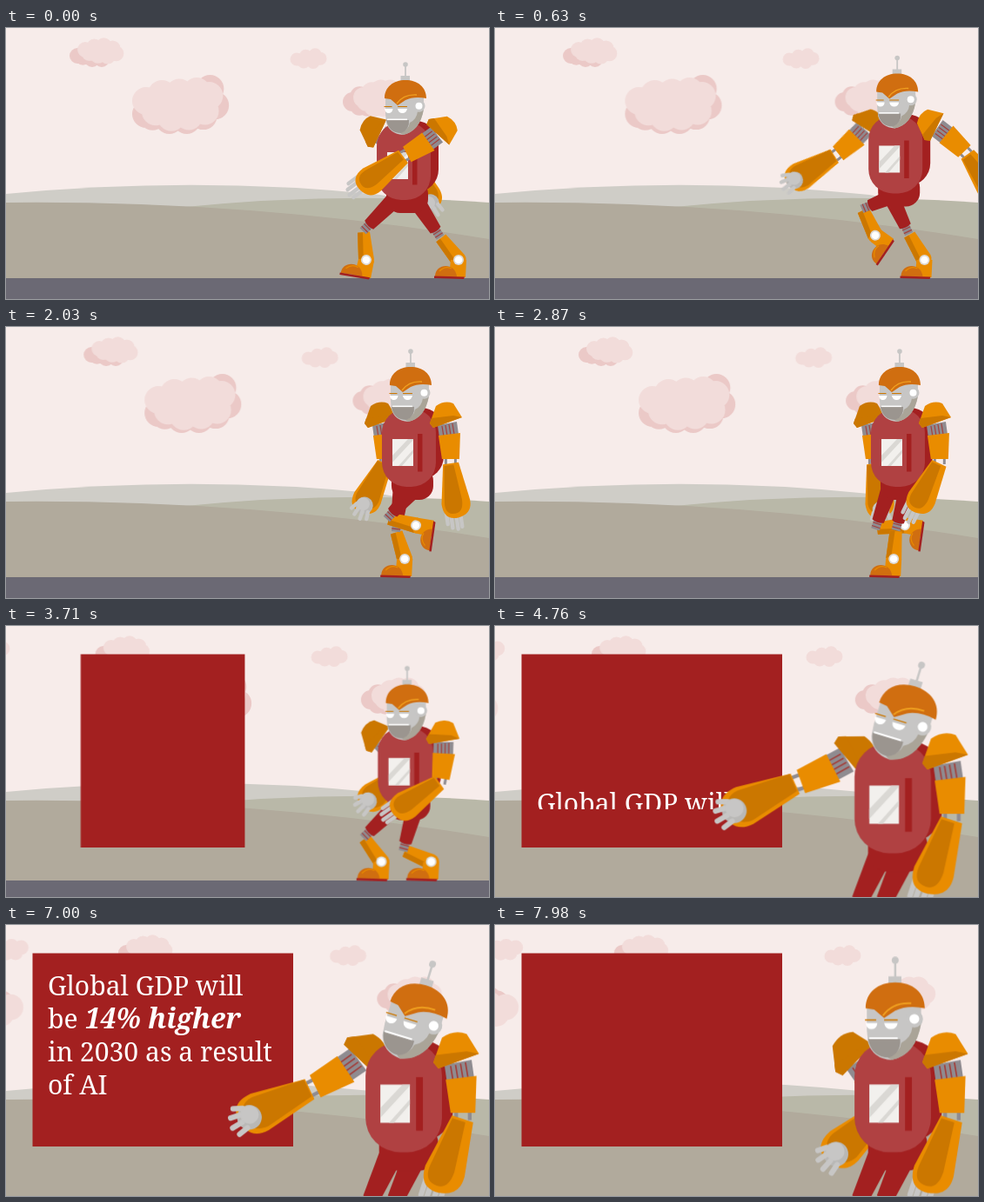
Animation, 555 px wide and 312 px high, one loop 8000 ms. Source, as an HTML page:

```html
<!DOCTYPE html>
<html lang="en">
<head>
<meta charset="utf-8">
<title>Robot presenter</title>
<style>
html, body { margin: 0; width: 100%; height: 100%; overflow: hidden; background: #f7ecea; }
svg { display: block; width: 100vw; height: 100vh; }
.cloud { animation: drift 8s linear infinite; stroke-linejoin: round; stroke-linecap: round; stroke-dasharray: 0 11; }
.cloud.big { stroke-dasharray: 0 20; }
.cloud .back { fill: #ebc9c7; stroke: #ebc9c7; }
.cloud .front { fill: #f2dcda; stroke: #f2dcda; }
#panel { transform-origin: 180.25px 0; animation: open 8s cubic-bezier(.65,0,.35,1) infinite; }
#copy { font: 30.1px "Noto Serif", serif; fill: #fff; animation: reveal 8s cubic-bezier(.65,0,.35,1) infinite; }
#copy .strong { font-weight: 900; font-style: italic; font-size: 32px; }
.red { fill: #a32020; }
.body { fill: #b04142; }
.gold { fill: #e98c00; }
.amber { fill: #cb7700; }
.dots { fill: #d06e10; }
.grey { fill: #c7c6c5; }
.white { fill: #fff; }
.pad { fill: var(--pad, #e98c00); }
.finger { fill: none; stroke: #c7c6c5; stroke-width: 4.4; stroke-linecap: round; }
.coil { fill: #8f8b90; }
.ribs { fill: none; stroke: #a3403c; stroke-width: 1.2; }
#farArm { --pad: #cb7700; }
@keyframes drift { to { transform: translateX(var(--dx)); } }
@keyframes open {
  0%, 42.5% { transform: scaleX(0); }
  49.6%, 100% { transform: scaleX(1); }
}
@keyframes reveal {
  0%, 56.9% { transform: translateY(165px); }
  65.2%, 85.6% { transform: none; }
  93.7%, 100% { transform: translateY(165px); }
}
</style>
</head>
<body>
<svg viewBox="0 0 555 312" preserveAspectRatio="none">
  <defs>
    <clipPath id="copyBox"><path d="M31 33H330V211H31z"/></clipPath>

    <g id="upperArm">
      <path class="coil" d="M-10 8L12 4L14 18L-8 22z"/>
      <path class="ribs" d="M-5 9l2 12M-1 8l2 12M3 7l2 12M7 6l2 12"/>
      <path class="coil" d="M-2 46h3v7h-3zM9 46h3v7h-3z"/>
      <path class="gold" d="M-9 20L16 17L15 47L-5 47z"/>
      <path class="pad" d="M-19 6L-12 -14Q-2 -21 8 -17L18 -1L-15 11z"/>
      <path class="amber" d="M-19 6L-17 0L8 -3L18 -1L-15 11z"/>
    </g>
    <path id="sleeve" d="M-9 1L9 1L16 45C17 60 7 63 0 64C-12 65 -17 58 -17 46z"/>
    <g id="nearFore">
      <path class="finger" d="M-13 54L-13 70M-8 58L-8 75M-2 60L-2 77M3 60L3 75"/>
      <use href="#sleeve" class="gold"/>
      <path class="amber" d="M-8 3L3 3L7 44C7 56 2 59 -3 59C-10 59 -14 55 -13.500 46z"/>
    </g>
    <g id="farFore">
      <use href="#sleeve" class="gold"/>
      <path class="amber" d="M-9 2L6 2L13 44C13 55 6 59 0 59C-8 59 -14 55 -14 46z"/>
      <circle cy="55" r="10" fill="#b9b8b6"/>
      <path class="finger" d="M-9 57L-12 64M-5 61L-6 69M1 62L2 71M7 60L9 68"/>
      <circle class="grey" cx="-2" cy="54" r="7.500"/>
    </g>

    <g id="thigh">
      <path class="coil" d="M-5 44h10v11h-10z"/>
      <path class="ribs" d="M-5 48h10M-5 52h10"/>
      <path class="red" d="M-10 0Q0 -10 10 0L7 45Q0 48 -7 45z"/>
    </g>
    <g id="shin">
      <path class="gold" d="M-7 2L7 2L9 34A9 9 0 0 1 -9 34z"/>
      <path class="amber" d="M-7 2L-1 2L-3 30L-9 34z"/>
    </g>
    <g id="foot">
      <path class="gold" d="M-9 0L9 0L8 20L-11 20z"/>
      <path class="dots" d="M-27 19C-27 4 -4 2 -2 19z"/>
      <path d="M-22 13Q-15 6 -8 10" fill="none" stroke="#e98c00" stroke-width="1.2"/>
      <path class="red" d="M-28 18.5L7 19.5L6 22L-28 21z"/>
      <circle r="6" fill="#dcd9d5"/>
      <circle class="white" r="4.3"/>
    </g>
  </defs>

  <path fill="#f7ecea" d="M0 0H555V312H0z"/>

  <g class="cloud" style="--dx:64px">
    <path class="back" stroke-width="18" d="M82 32L90 26L116 33L112 36L97 36z"/>
    <path class="front" stroke-width="18" d="M91 25L103 21L116 20L129 27L122 33L108 32L98 31z"/>
  </g>
  <g class="cloud" style="--dx:52px">
    <path class="front" stroke-width="15" d="M334 36L345 32L361 30L361 38L350 40L342 39z"/>
  </g>
  <g class="cloud big" style="--dx:56px">
    <path class="back" stroke-width="32" d="M161 99L234 69L241 92L222 104L207 106L180 106z"/>
    <path class="front" stroke-width="32" d="M161 84L178 76L206 74L233 72L234 91L224 99L207 102L184 103L168 94z"/>
  </g>
  <g class="cloud" style="--dx:45px">
    <path class="back" stroke-width="22" d="M398 85L406 78L420 88L412 93z"/>
    <path class="front" stroke-width="24" d="M411 80L424 72L441 71L451 81L437 90L420 90z"/>
  </g>
  <g class="cloud" style="--dx:52px">
    <path class="front" stroke-width="17" d="M-60 30L-44 24L-28 26L-29 31L-40 33z"/>
  </g>
  <g class="cloud big" style="--dx:59px">
    <path class="back" stroke-width="28" d="M-85 90L-54 82L-60 95z"/>
    <path class="front" stroke-width="30" d="M-85 97L-60 90L-43 96L-54 102L-75 102z"/>
  </g>

  <path fill="#cfcdc7" d="M0 191Q220 170 430 192L555 215V312H0z"/>
  <path fill="#b9b8a8" d="M195 207Q380 188 555 201V312H195z"/>
  <path fill="#b1aa9c" d="M0 201Q280 198 555 243V312H0z"/>

  <path id="panel" class="red" d="M30.5 32.5H330V255H30.5z"/>
  <g clip-path="url(#copyBox)">
    <g id="copy">
      <text x="48" y="71">Global GDP will</text>
      <text x="48" y="109">be <tspan class="strong">14% higher</tspan></text>
      <text x="48" y="147">in 2030 as a result</text>
      <text x="48" y="185">of AI</text>
    </g>
  </g>

  <g id="stage">
    <path fill="#6b6974" d="M-200 288H900V400H-200z"/>
    <g id="farArm"><use href="#upperArm"/><use id="farForearm" href="#farFore"/></g>
    <use id="farShin" href="#shin"/><use id="farFoot" href="#foot"/><use id="farThigh" href="#thigh"/>
    <use id="nearShin" href="#shin"/><use id="nearFoot" href="#foot"/><use id="nearThigh" href="#thigh"/>
    <g id="torso">
      <rect class="red" x="-20" y="22" width="48" height="38" rx="16"/>
      <rect class="red" x="-16" y="-46" width="56" height="82" rx="26"/>
      <rect class="body" x="-31" y="-45" width="62" height="90" rx="28"/>
      <path fill="#f2f0ed" d="M-19 -10H5V21H-19z"/>
      <path fill="#dad8d4" d="M-19 17V9L-1 -10H5V-9zM-12 21L5 2V6L-8 21z"/>
      <path class="red" d="M10 -16h5.5v43.5h-5.5z"/>
      <g id="head">
        <path class="grey" d="M-5.5 -26h10.5v6h-10.5zM-.9 -38h1.800v13h-1.800z"/>
        <circle class="grey" cy="-39" r="2.8"/>
        <path class="grey" d="M-23 -2L-23 18L-22 28Q-18 41 -3 42Q16 38 21 13L21 -2z"/>
        <path fill="#aaa498" d="M21 12Q17 38 -3 42L-6 40Q4 36 5 28Q13 24 14 15z"/>
        <path fill="#9b958f" d="M-22 25H4Q5 36 -5 40Q-19 40 -22 25z"/>
        <path class="white" d="M-21 23.6H2v1.5H-21z"/>
        <g id="eyes" class="white">
          <path d="M-24 12H-14.5Q-15 17 -19.5 17Q-23 17 -24 12zM-9 12H2Q1 17 -3.5 17Q-8 17 -9 12z"/>
        </g>
        <path id="brows" d="M-24.5 9.5h9M-9 9.5h11" stroke="#cb7700" stroke-width="1"/>
        <circle class="grey" cx="15.5" cy="8.7" r="7"/>
        <circle class="white" cx="15.5" cy="8.7" r="4"/>
        <path class="dots" d="M-24 0C-24 -13 -14 -21 0 -21S24 -13 24 0Q10 -3 0 2L-9 8L-17 1z"/>
        <path d="M-10 6Q-2 -5 13 -4" fill="none" stroke="#f0a020" stroke-width="1.4"/>
      </g>
    </g>
    <g id="nearArm"><use href="#upperArm"/><use id="nearForearm" href="#nearFore"/></g>
  </g>
</svg>
<script>
const LOOP = 8000, STEP = 70, CYCLE = 1680, WALK_END = 3360;
const THIGH = 54, SHIN = 34, DEG = 180 / Math.PI, TAU = Math.PI * 2;
const part = id => document.getElementById(id);
const place = (id, x, y, angle = 0) =>
  part(id).setAttribute('transform', `translate(${x} ${y}) rotate(${angle})`);

function tween(t, from, to) {
  const u = Math.min(1, Math.max(0, (t - from) / (to - from)));
  return u < .5 ? 4 * u ** 3 : 1 - 4 * (1 - u) ** 3;
}
const mix = (a, b, k) => a.map((v, i) => v + (b[i] - v) * k);

// Upper and lower arm angles; positive swings to the left.
function armSwing(p) {
  const c = Math.cos(TAU * p), s = Math.sin(TAU * p), c2 = Math.cos(2 * TAU * p);
  return [4 + 53.5 * c - 14.4 * s + 4.5 * c2, 11.3 + 39 * c - 28 * s + 2.7 * c2];
}

// Ankle x, y and foot angle: stance first, then swing.
function ankle(phase) {
  const p = phase % 1;
  if (p < .5) return [414 + 212 * p, 267, 8 * Math.max(0, 1 - p / .06)];
  const u = p * 2 - 1, lift = Math.sin(Math.PI * u);
  return [520 - 106 * u - 5 * lift, 267 - 40 * lift, 8 * u - 90 * lift];
}

// Pose: torso x, y; near arm; far arm; far foot; near foot.
function walk(p) {
  const bob = Math.cos(2 * TAU * p);
  return [460.2 - 3.2 * bob, 145.5 + 7.5 * bob,
    ...armSwing(p), ...armSwing(p + .5), ...ankle(p), ...ankle(p + .5)];
}
const upright = [445, 278, 0, 465, 278, 0];
const crouch = [459, 160, 10, 55, -35, 52, 432, 267, 0, 488, 267, 0];
const point = [458.8, 157, 0, 18, 70, 66, ...upright];
const rest = [458.8, 157, 0, 18, -26, 48, ...upright];

function pose(t) {
  if (t < WALK_END) return walk(t / CYCLE % 1);
  const stand = mix(walk(0), crouch, tween(t, WALK_END, 3700));
  return mix(mix(stand, point, tween(t, 3950, 4720)), rest, tween(t, 6820, 7520));
}

function drawArm(name, x, y, upper, lower) {
  place(name + 'Arm', x, y, upper);
  place(name + 'Forearm', 5, 51, lower - upper);
}

function drawLeg(name, hx, hy, ax, ay, footAngle) {
  const dx = hx - ax, dy = ay - hy;
  const d = Math.min(Math.hypot(dx, dy), THIGH + SHIN - .1);
  const bend = Math.acos((THIGH ** 2 + d ** 2 - SHIN ** 2) / (2 * THIGH * d));
  const a = Math.atan2(dx, dy) + bend;
  const kx = hx - THIGH * Math.sin(a), ky = hy + THIGH * Math.cos(a);
  place(name + 'Thigh', hx, hy, a * DEG);
  place(name + 'Shin', kx, ky, Math.atan2(kx - ax, ay - ky) * DEG);
  place(name + 'Foot', ax, ay, footAngle);
}

function draw(t) {
  const [x, y, nearUpper, nearLower, farUpper, farLower, ...legs] = pose(t);
  const zoom = 1 + .417 * tween(t, 3500, 4400);
  part('stage').setAttribute('transform',
    `translate(463 59) scale(${zoom}) translate(-463 -59)`);
  place('torso', x, y);
  drawArm('near', x + 43, y - 34, nearUpper, nearLower);
  drawArm('far', x - 32, y - 34, farUpper, farLower);
  drawLeg('far', x - 8, y + 42, ...legs.slice(0, 3));
  drawLeg('near', x + 12, y + 42, ...legs.slice(3));

  const tilt = 17 * (tween(t, 4050, 4720) - tween(t, 6950, 7850));
  part('head').setAttribute('transform', `translate(2 -72) rotate(${tilt} 0 34)`);
  const wide = tween(t, 5200, 5450) - tween(t, 6000, 6250);
  const eyeScale = 1 + .4 * wide;
  part('eyes').setAttribute('transform', `translate(0 ${17 - 17 * eyeScale}) scale(1 ${eyeScale})`);
  part('brows').setAttribute('opacity', 1 - wide);
}

let start;
function tick(now) {
  start ??= now;
  draw(Math.floor(((now - start) % LOOP + 4) / STEP) * STEP);
  requestAnimationFrame(tick);
}
draw(0);
requestAnimationFrame(tick);
</script>
</body>
</html>
```
